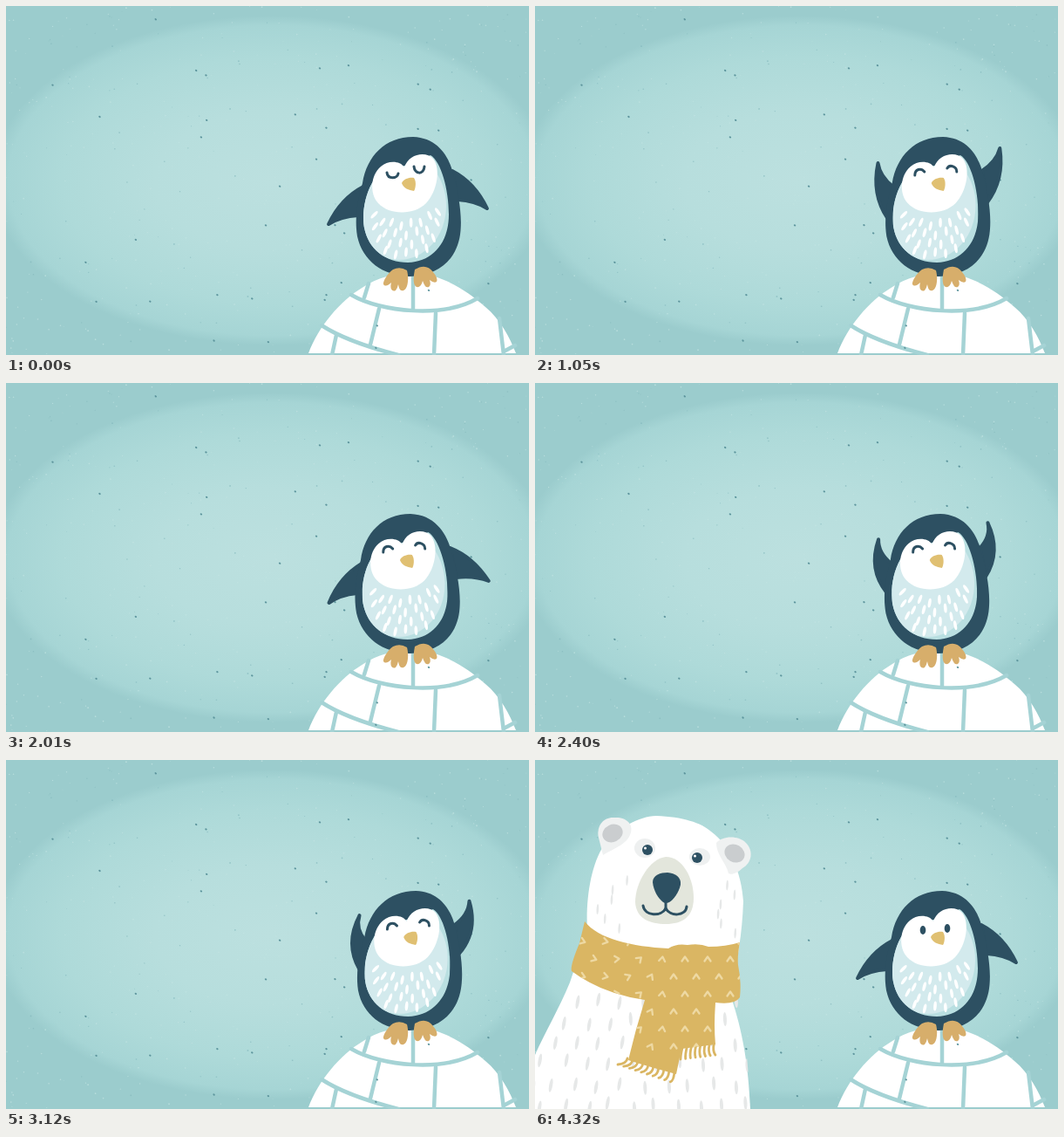
An HTML page for the animation above (5280 ms loop, 600 px wide and 400 px high).

```html
<!DOCTYPE html>
<html lang="en">
<head>
<meta charset="utf-8">
<style>
html, body { margin: 0; width: 100%; height: 100%; overflow: hidden; background: #9bcccd; }
svg { display: block; width: 600px; height: 400px; }
.line { fill: none; stroke-linecap: round; stroke-linejoin: round; }
</style>
</head>
<body>
<svg viewBox="0 0 600 400">
  <defs>
    <radialGradient id="glow">
      <stop offset="0" stop-color="#bce0df"/><stop offset=".42" stop-color="#b7dedd"/>
      <stop offset=".75" stop-color="#aedad9"/><stop offset=".94" stop-color="#a6d5d5"/>
      <stop offset="1" stop-color="#9bcccd"/>
    </radialGradient>
    <filter id="smear" filterUnits="userSpaceOnUse" x="-100" y="0" width="800" height="420">
      <feGaussianBlur stdDeviation="20 0"/>
    </filter>
    <clipPath id="bellyClip"><path d="M455 184C426 178 410 214 410 243C410 274 432 294 461 294C490 293 508 271 508 239C508 210 499 178 487 171Z"/></clipPath>
    <clipPath id="furClip"><path d="M76 400C79 350 110 310 133 255L325 265C334 310 338 350 340 400Z"/></clipPath>
    <clipPath id="scarfClip"><use href="#scarf"/></clipPath>
  </defs>

  <rect width="600" height="400" fill="#9bcccd"/>
  <ellipse cx="305" cy="200" rx="322" ry="189" fill="url(#glow)"/>
  <g id="dust"></g>

  <g id="igloo">
    <path fill="#fff" d="M347 398C359 367 383 338 410 322C425 312 445 306 468 306C500 307 530 327 550 345C567 359 578 380 585 398Z"/>
    <path class="line" stroke="#a5d3d5" stroke-width="4.5" d="M396 331C430 351 502 358 541 335M362 366C385 381 415 391 450 400M416 318L411 334M467 309V347M428 347L418 388M493 352L491 400M379 377L374 400M566 358L571 400M571 396L584 389"/>
  </g>
  <g id="specks" fill="#5d959d"></g>

  <g id="penguin">
    <g id="torso">
      <g fill="#2d5062" stroke="#2d5062" stroke-width="4" stroke-linejoin="round">
        <path id="wingL" transform="translate(922 18) scale(-1 1)"/><path id="wingR"/>
        <path stroke="none" d="M467 150C495 151 508 172 513 192C519 215 524 240 521 262C517 290 497 309 463 310C432 309 409 292 403 264C399 240 405 218 409 203C414 172 435 150 467 150Z"/>
      </g>
      <g clip-path="url(#bellyClip)">
        <rect x="400" y="160" width="120" height="140" fill="#b9dfe1"/>
        <ellipse cx="451" cy="229" rx="54" ry="62" fill="#d3eaed"/>
        <g id="feathers" fill="#fff"></g>
      </g>
      <path fill="#fff" d="M457 185C452 177 438 177 430 184C418 194 417 215 427 226C440 240 468 240 482 226C495 212 499 186 490 175C482 166 462 169 457 185Z"/>
      <path fill="#e0c072" d="M454 203C456 198 463 196 468 197C471 201 470 209 468 212C462 211 456 209 454 203Z"/>
      <g class="line" stroke="#2d5062" stroke-width="3">
        <path id="asleep" d="M437 191C438 199 449 198 450 192M468 184C469 193 479 194 480 184"/>
        <path id="happy" d="M435 194C435 187 442 185 446 190M472 186C475 181 483 184 483 190"/>
        <path id="brows" stroke-width="2.6" d="M431 191Q432 185 438 185M478 182Q484 181 486 187"/>
      </g>
      <g id="awake" fill="#2d5062">
        <ellipse cx="445" cy="195" rx="3.3" ry="5"/><ellipse cx="473" cy="193" rx="3.3" ry="5"/>
      </g>
    </g>
    <g fill="#d7ae6b">
      <path d="M444 302C438 306 432 316 433 319C435 322 439 320 442 317C440 324 443 328 447 326Q449 324 450 319C451 324 452 327 456 326C462 324 462 310 460 303Q452 298 444 302Z"/>
      <path d="M469 302C467 312 467 320 471 322C475 323 477 319 478 315Q481 324 485 322Q488 320 486 314Q491 318 494 316Q496 312 490 305Q482 294 469 302Z"/>
    </g>
  </g>

  <g id="bear">
    <path fill="#fff" d="M76 400C79 350 110 310 133 255L153 195C151 160 157 120 172 98C190 76 212 65 232 64C262 65 284 72 295 82C317 98 330 130 332 162Q331 190 327 215L318 272C331 310 338 350 340 400Z"/>
    <g fill="#eff1f1">
      <path d="M166 89C163 74 173 65 184 66C197 65 206 73 203 83C200 96 184 101 171 109Z"/>
      <path d="M301 95C308 87 326 86 335 95C344 104 342 118 331 124C325 130 318 132 315 130C312 117 301 109 301 95Z"/>
    </g>
    <g fill="#cacdcf">
      <ellipse cx="182" cy="84" rx="12" ry="10" transform="rotate(-25 182 84)"/>
      <ellipse cx="322" cy="107" rx="12" ry="10" transform="rotate(30 322 107)"/>
    </g>
    <g fill="#eef0f0">
      <ellipse cx="219" cy="101" rx="12" ry="11"/><ellipse cx="282" cy="111" rx="12" ry="10"/>
    </g>
    <path fill="#e3e6dc" d="M243 111C225 113 208 140 208 163C209 182 225 188 243 188C262 188 275 180 275 158C275 135 262 111 243 111Z"/>
    <path fill="#2d5062" d="M228 140C228 132 237 129 245 129C254 130 261 134 260 143C258 152 252 160 247 163Q243 165 240 163C234 158 229 150 228 140Z"/>
    <g class="line" stroke="#2d5062" stroke-width="3">
      <path d="M243 162V171"/>
      <path id="frown" d="M217 172Q221 177 228 175Q240 176 243 170Q247 178 265 177"/>
      <path id="smile" d="M217 167C219 179 238 180 243 170C248 180 266 179 267 168"/>
    </g>
    <g fill="#2d5062"><circle cx="222" cy="103" r="6"/><circle cx="279" cy="112" r="6"/></g>
    <g fill="#fff"><circle cx="219.500" cy="101" r="1.500"/><circle cx="276.500" cy="110" r="1.500"/></g>
    <g id="scowl" fill="#d2d5d8">
      <ellipse cx="229" cy="86" rx="10" ry="5" transform="rotate(24 229 86)"/>
      <ellipse cx="279" cy="95" rx="11" ry="5" transform="rotate(-10 279 95)"/>
    </g>
    <g fill="#e6e8e8"><g id="headFur"></g><g id="fur" clip-path="url(#furClip)"></g></g>
    <path id="fringe" class="line" stroke="#dab663" stroke-width="2.8"/>
    <path id="scarf" fill="#dab663" d="M150 185C165 205 205 214 246 216Q255 210 268 212Q282 210 292 214Q312 214 328 209Q325 225 326 235Q330 255 328 272Q322 281 300 278Q298 305 300 326L261 331L255 360Q225 352 200 344Q208 310 219 275Q170 268 135 242Q133 236 144 210Z"/>
    <g id="chevrons" class="line" stroke="#eed9a3" stroke-width="2.3" clip-path="url(#scarfClip)"></g>
  </g>
</svg>
<script>
const LOOP = 5280, STEP = 30, TAU = 2 * Math.PI;
const $ = id => document.getElementById(id);
const show = (id, on) => $(id).style.display = on ? '' : 'none';
const fill = (id, n, make) => $(id).innerHTML = Array.from({ length: n }, (_, i) => make(i)).join('');

let seed = 7;
const rnd = (from, to) => from + (to - from) * ((seed = seed * 16807 % 2147483647) / 2147483647);

const leaf = (x, y, rx, ry, turn) =>
  `<ellipse cx="${x}" cy="${y}" rx="${rx}" ry="${ry}" transform="rotate(${turn} ${x} ${y})"/>`;

// Backdrop texture
fill('dust', 520, i => `<circle cx="${rnd(0, 600)}" cy="${rnd(0, 400)}" r="${rnd(.4, .9)}"
  fill="${i % 4 ? '#c3e4e3' : '#84b9bd'}" opacity=".7"/>`);
fill('specks', 36, () => leaf(rnd(0, 600), rnd(0, 400), 1.3, 1, 30));

// Breast feathers fan out in four shrinking rows
fill('feathers', 4, row => {
  const n = 8 - row, spread = 39 - 8 * row, r = 58 + 11 * row;
  let marks = '';
  for (let i = 0; i < n; i++) {
    const deg = spread * (2 * i / (n - 1) - 1), a = deg * Math.PI / 180;
    marks += leaf(459 + r * Math.sin(a), 191 + r * Math.cos(a) - deg * .08 + i % 2 * 3, 1.8, 5.5, 5 - deg);
  }
  return marks;
});

// Bear fur
fill('fur', 60, i => {
  const row = Math.floor(i / 10), x = 85 + i % 10 * 26 + row % 2 * 13;
  return leaf(x + rnd(0, 6), 272 + row * 24 + rnd(0, 8), 2, 8, x < 200 ? 10 : -3);
});
fill('headFur', 12, i => leaf(i % 2 ? 325 - rnd(0, 30) : 160 + rnd(0, 40), 138 + i * 5.5, 1.3, 6, 3));

// Scarf: staggered chevrons turn upright away from the left edge
fill('chevrons', 56, i => {
  const row = Math.floor(i / 8), x = 148 + i % 8 * 26 + row % 2 * 13, y = 208 + row * 20;
  const turn = 110 * Math.max(0, 1 - Math.max(0, x - 170) / 75);
  return `<path d="M-3.500 2.500L0 -2.500L3.500 2.500" transform="translate(${x} ${y}) rotate(${turn})"/>`;
});
let fringe = '';
for (let i = 0; i < 10; i++)
  fringe += `M${199 + i * 6} ${342 + i * 1.7}q-1 ${6 + i * .5} ${-11 + i * .7} ${7 + i * .5}`;
for (let i = 0; i < 8; i++)
  fringe += `M${262 + i * 5.2} ${330 - i * .7}q-2 8 ${i * .5 - 2} 13`;
$('fringe').setAttribute('d', fringe);

// The right-hand wing swings about its root; the left one mirrors it
function wing(id, lift, tilt) {
  const a = (37 - 117 * lift + tilt) * TAU / 360, dx = Math.cos(a), dy = Math.sin(a);
  const tip = [516 + 45 * dx, 205 + 45 * dy];
  const bow = ([x, y], k) => [(x + tip[0]) / 2 + k * dy, (y + tip[1]) / 2 - k * dx];
  const top = [512, 189], pit = [518, 222 + 14 * Math.sin(Math.PI * lift)];
  $(id).setAttribute('d', `M${top}Q${bow(top, 10 - 18 * lift)} ${tip}Q${bow(pit, 5 - 22 * lift * lift)} ${pit}Z`);
}

function bearAt(t) {
  if (t < 3270) return -360 * (1 - (t - 3120) / 150) ** 2;
  return -93 * Math.min(1, Math.max(0, (t - 3990) / 60));
}

function draw(time) {
  const t = Math.floor(time % LOOP / STEP) * STEP;

  let lift = t < 2310 ? (1 - Math.cos(TAU * t / 660)) / 2 : 1;
  let lean = 1.2 * Math.sin(TAU * t / 429);
  if (t >= 3150) lean += (2.5 - lean) * Math.min(1, (t - 3150) / 60);
  if (t >= 4020) {
    const settle = Math.max(0, (4050 - t) / 60);
    lift = settle;
    lean = 2.5 * settle;
  }
  wing('wingR', lift, 5 * lean);
  wing('wingL', lift, -5 * lean);
  $('torso').setAttribute('transform', `translate(463 310) skewX(${-lean}) translate(-463 -310)`);

  const startled = t >= 3210, cross = t < 4050;
  show('asleep', t < 270);
  show('happy', t >= 270 && !startled);
  show('awake', startled);
  show('brows', startled && t < 4320);

  const moving = t < 3270 || t >= 4020 && t < 4050;
  show('bear', t >= 3150);
  $('bear').setAttribute('transform', `translate(${bearAt(t)} 0)`);
  $('bear').setAttribute('filter', moving ? 'url(#smear)' : 'none');
  show('frown', cross);
  show('scowl', cross);
  show('smile', !cross);
}

const start = performance.now();
function tick() {
  draw(performance.now() - start);
  requestAnimationFrame(tick);
}
tick();
</script>
</body>
</html>
```
